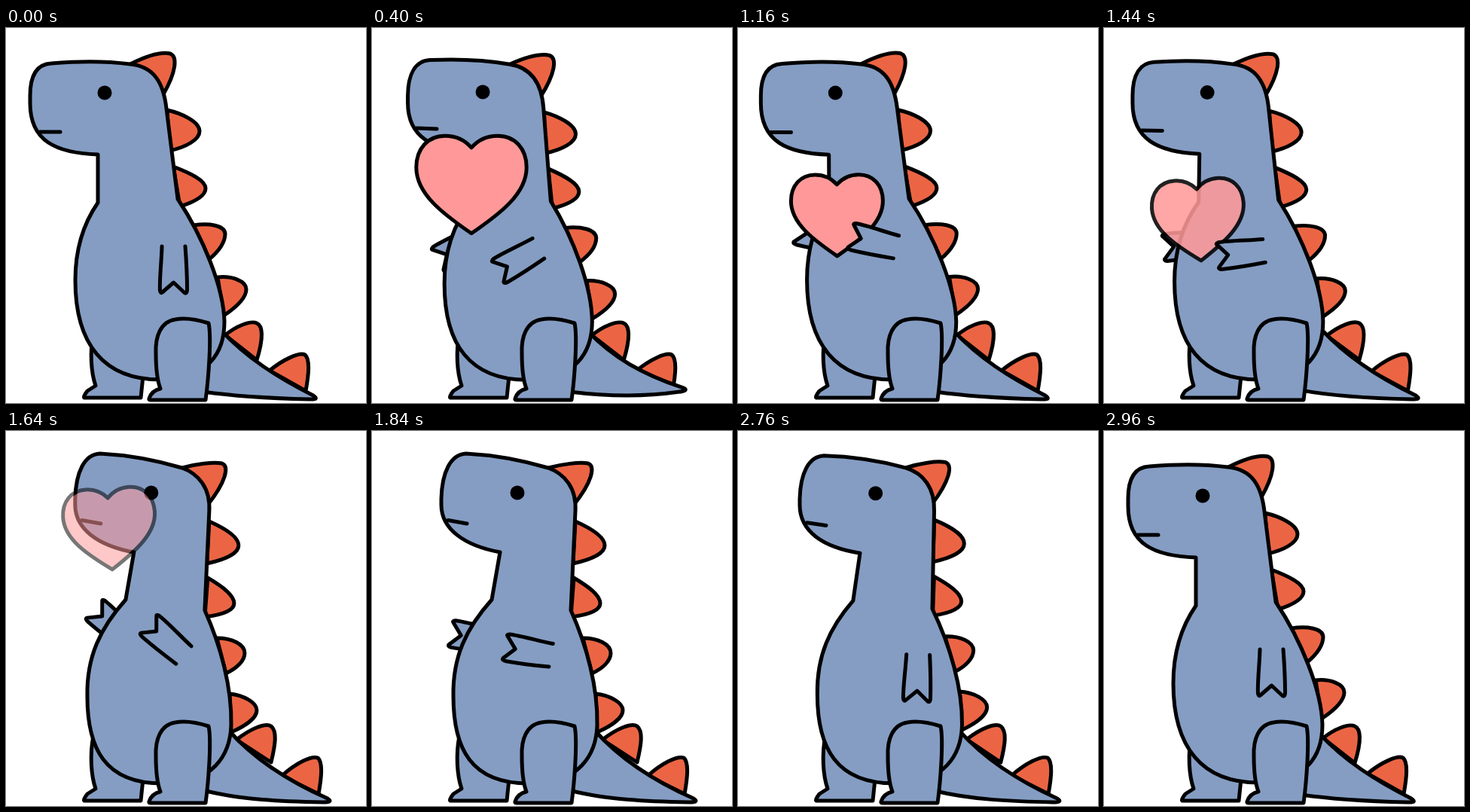
An HTML page that plays this animation: 478x498 px, repeating every 3200 ms.

```html
<!DOCTYPE html>
<html lang="en">
<head>
<meta charset="utf-8">
<title>Dinosaur with a heart</title>
<style>
html, body { margin: 0; width: 100%; height: 100%; overflow: hidden; background: #fff; }
svg { display: block; width: 100%; height: 100%; }
path { stroke: #000; stroke-width: 5; stroke-linecap: round; stroke-linejoin: round; }
.skin { fill: #859dc3; }
.spike { fill: #eb6544; }
.heart { fill: #ff9999; }
</style>
</head>
<body>
<svg id="stage" viewBox="0 0 478 498"></svg>
<script>
const LOOP = 3200, STEP = 40;
const stage = document.getElementById('stage');

function add(tag, cls, attrs) {
  const el = document.createElementNS('http://www.w3.org/2000/svg', tag);
  if (cls) el.setAttribute('class', cls);
  set(el, attrs || {});
  stage.appendChild(el);
  return el;
}

function set(el, attrs) {
  for (const name in attrs) el.setAttribute(name, attrs[name]);
}

const lerp = (a, b, k) => a + (b - a) * k;
const smooth = p => p * p * (3 - 2 * p);

// Blends two paths of the same structure.
function mix(a, b, k) {
  const nums = b.match(/-?[\d.]+/g);
  let i = 0;
  return a.replace(/-?[\d.]+/g, n => lerp(+n, +nums[i++], k).toFixed(2));
}

// Eased value of a [time, value] track.
function at(t, track) {
  if (t <= track[0][0]) return track[0][1];
  for (let i = 1; i < track.length; i++) {
    const [t0, v0] = track[i - 1], [t1, v1] = track[i];
    if (t < t1) return lerp(v0, v1, smooth((t - t0) / (t1 - t0)));
  }
  return track[track.length - 1][1];
}

// Each pair: crouched pose, upright pose.
const body = [
  'M122 168C66 166 32 150 32 100L32 90C32 62 42 48 60 47C95 44 135 44 165 48C196 51 209 72 213 107L228 227C262 278 289 345 290 390C290 430 270 466 205 467C130 467 92 420 92 335C92 292 104 258 122 232Z',
  'M170 161C122 152 92 130 92 98L92 90C93 55 104 31 125 30C165 32 200 39 234 49C256 57 272 76 270 107L264 238C285 285 300 340 299 390C298 430 275 468 212 468C130 470 108 420 108 352C107 300 125 262 159 224Z'
];
const backSpikes = [
  ['M165 48C185 38 205 31 218 34C228 38 226 58 209 88Z', 'M234 49C252 44 275 41 287 43C297 47 292 68 268 98Z'],
  ['M214 109C232 113 257 124 257 137C257 148 240 158 217 163Z', 'M270 120C288 128 309 140 309 152C309 163 290 171 267 176Z'],
  ['M222 184C243 192 265 202 265 213C265 223 250 231 231 237Z', 'M268 195C288 207 303 218 303 229C303 238 288 244 264 247Z'],
  ['M249 262C270 259 290 262 291 273C291 284 283 296 270 307Z', 'M280 275C300 275 317 283 317 295C317 305 307 315 292 322Z'],
  ['M281 331C300 329 319 336 319 347C319 359 304 372 289 382Z', 'M297 349C315 351 333 360 333 371C333 382 315 393 299 400Z']
];
const tailSpikes = [
  ['M291 408C305 396 325 388 333 392C342 396 341 415 333 441Z', 'M306 410C325 395 345 387 352 392C360 399 358 415 352 440Z'],
  ['M350 455C368 440 390 430 397 434C404 440 402 460 398 482Z', 'M366 458C385 441 405 431 414 434C421 440 419 460 415 482Z']
];
const tail = [
  'M272 386L286 402C320 438 360 464 408 488C415 493 410 493 402 493C360 492 310 490 262 483L240 440Z',
  'M282 384L296 398C330 436 375 465 427 488C433 492 429 493 421 493C370 492 310 490 262 477L240 440Z'
];
const tailUp = 'M272 386L286 402C320 438 360 460 412 477C421 480 415 482 407 483C360 490 310 489 262 483L240 440Z';
const mouth = ['M45 138L72 138', 'M101 118.5L126 123'];
const armShape = 'M-15.5 0C-16 20 -19 45 -18 59Q-17 63 -15 61L0 48L15 62Q18 63 18 57C18 40 17 20 15.5 0';
const heartShape = 'M0 -41C8 -50 18 -54 29 -54C48 -54 61 -40 61 -19C61 10 32 32 0 54C-32 32 -61 10 -61 -19C-61 -40 -48 -54 -29 -54C-18 -54 -8 -50 0 -41Z';

const tracks = {
  lean: [[130, 0], [320, .35], [560, 0], [1140, 0], [1280, -.5], [1650, 1], [2690, 1], [2960, 0]],
  tail: [[1320, 0], [1640, 1], [2690, 1], [2960, 0]],
  lift: [[140, 0], [380, 1], [560, 0]],
  turn: [[210, 0], [560, 105], [1140, 105], [1320, 62], [1640, 129], [1690, 129], [2160, 0]],
  armX: [[210, 0], [560, -12], [1440, -12], [1640, -6.5], [1690, -6.5], [2160, 0]],
  armY: [[210, 0], [560, 1], [1140, 1], [1440, 5], [1640, -1], [2160, 0]],
  farX: [[210, -72], [400, -80], [560, -72]],
  farY: [[210, -12], [400, -16], [560, -7], [1140, -7], [1440, -11], [1640, -20], [1690, -20], [2160, -12]],
  heartX: [[1140, 132], [1310, 118], [1440, 125.6], [1640, 137.8]],
  heartY: [[400, 208], [560, 248], [1140, 248], [1310, 270], [1440, 255]],
  heartTurn: [[1140, 0], [1310, -6], [1440, -3.6]],
  heartSize: [[130, 0], [380, 1.2], [400, 1.2], [560, 1]]
};

const tailSpikeEls = tailSpikes.map(() => add('path', 'spike'));
const backSpikeEls = backSpikes.map(() => add('path', 'spike'));
const tailEl = add('path', 'skin');
add('path', 'skin', { d: 'M116 405C111 430 113 458 119 475L108 482Q102 490 104 491L179 491L182 462L150 440Z' });
const farArm = add('path', 'skin', { d: armShape });
const bodyEl = add('path', 'skin');
const eye = add('circle', '', { r: 9.5 });
const mouthEl = add('path', '', { fill: 'none' });
add('path', 'skin', { d: 'M269 392C250 386 235 385 225 387C205 390 198 410 199 432C199 452 200 466 205 479C196 481 192 486 190 492Q189 494 192 494L265 494C269 465 273 410 269 392Z' });
const heart = add('path', 'heart', { d: heartShape, 'vector-effect': 'non-scaling-stroke' });
const nearArm = add('path', 'skin', { d: armShape });

function draw(t) {
  const v = {};
  for (const name in tracks) v[name] = at(t, tracks[name]);

  set(bodyEl, { d: mix(...body, v.lean) });
  set(mouthEl, { d: mix(...mouth, v.lean) });
  set(eye, { cx: lerp(131, 193, v.lean), cy: lerp(86, 82, v.lean) });
  backSpikes.forEach((s, i) => set(backSpikeEls[i], { d: mix(...s, v.lean) }));
  tailSpikes.forEach((s, i) => set(tailSpikeEls[i], { d: mix(...s, v.tail + v.lift * .07) }));
  set(tailEl, { d: mix(mix(...tail, v.tail), tailUp, v.lift) });

  const x = 222.5 + 20 * v.lean + v.armX, y = 290 + 8.5 * v.lean + v.armY;
  const turn = v.turn + 2 * v.lean;
  set(nearArm, { transform: `translate(${x} ${y}) rotate(${turn})` });
  set(farArm, { transform: `translate(${x + v.farX} ${y + v.farY}) rotate(${turn})` });

  // After the toss the heart speeds up and fades away.
  const rise = 125 * Math.pow(Math.max(0, (t - 1440) / 200), 1.6);
  const fade = Math.max(0, Math.min(1, (1960 - t) / 600));
  const shown = t >= 160 && fade > 0;
  set(heart, {
    transform: `translate(${v.heartX} ${v.heartY - rise}) rotate(${v.heartTurn}) scale(${v.heartSize})`,
    opacity: fade,
    display: shown ? 'inline' : 'none'
  });
}

const start = performance.now();
function tick() {
  const t = (performance.now() - start) % LOOP;
  draw(Math.floor(t / STEP) * STEP);
  requestAnimationFrame(tick);
}
tick();
</script>
</body>
</html>
```
